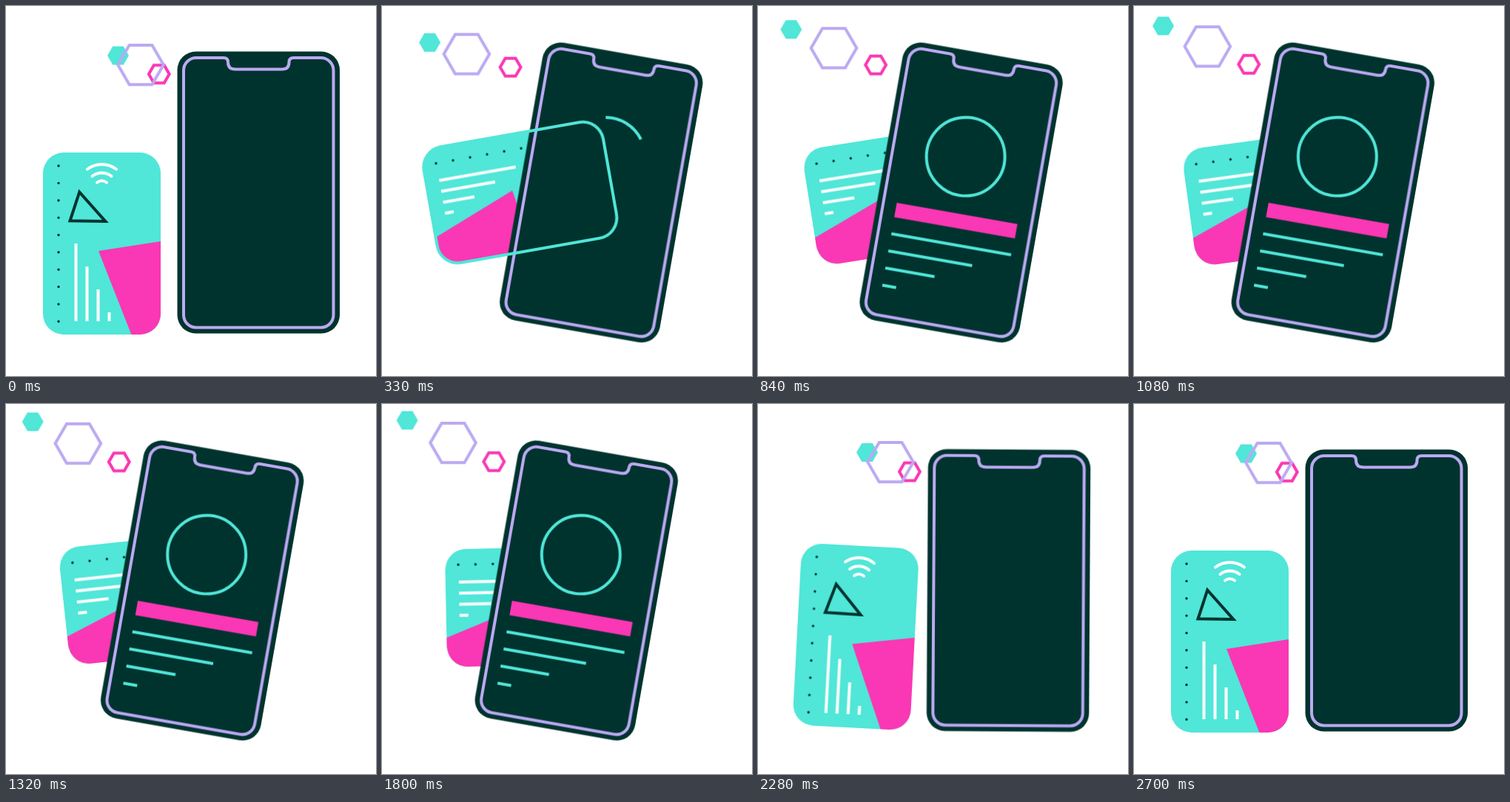
Recreate the animation shown at these times as an HTML page. Size 500 px wide and 500 px high, loop 2.76 s.

```html
<!DOCTYPE html>
<html lang="en">
<head>
<meta charset="utf-8">
<title>Card and phone</title>
<style>
  :root {
    --dark: #00332e;
    --teal: #50e6d8;
    --pink: #fa37b4;
    --lilac: #bba9f2;
  }
  html, body { margin: 0; width: 100%; height: 100%; overflow: hidden; background: #fff; }
  svg { display: block; width: 100%; height: 100%; }

  .hex, .phone, .card-x, .card-y, .card-spin, .outline, .trim {
    animation: 2760ms linear infinite;
  }
  .line { fill: none; stroke-width: 4; }

  /* Three beats: swing out to 12%, drift to 65.22%, return home by 86.96% */
  .hex { animation-name: hex; }
  @keyframes hex {
    0% { transform: translate(0, 0); animation-timing-function: cubic-bezier(.5, 0, .5, 1); }
    12% { transform: translate(var(--ax), var(--ay)); animation-timing-function: cubic-bezier(.33, .83, .67, 1); }
    65.22% { transform: translate(var(--bx), var(--by)); animation-timing-function: cubic-bezier(.6, 0, .3, 1); }
    86.96%, 100% { transform: translate(0, 0); }
  }

  .phone { animation-name: phone; transform-origin: 341px 252px; }
  @keyframes phone {
    0% { transform: translate(0) rotate(0deg); animation-timing-function: cubic-bezier(.5, 0, .5, 1); }
    12% { transform: translate(-45px) rotate(10deg); animation-timing-function: cubic-bezier(.33, .83, .67, 1); }
    65.22% { transform: translate(-78.5px) rotate(10deg); animation-timing-function: cubic-bezier(.6, 0, .3, 1); }
    86.96%, 100% { transform: translate(0) rotate(0deg); }
  }

  /* Separate axes bend the card's path */
  .card-x { animation-name: card-x; }
  @keyframes card-x {
    0% { transform: translateX(0); animation-timing-function: cubic-bezier(.42, 0, .32, 1); }
    12% { transform: translateX(57.3px); animation-timing-function: cubic-bezier(.33, .1, .67, .65); }
    65.22% { transform: translateX(80px); animation-timing-function: cubic-bezier(.6, 0, .3, 1); }
    86.96%, 100% { transform: translateX(0); }
  }
  .card-y { animation-name: card-y; }
  @keyframes card-y {
    0% { transform: translateY(0); animation-timing-function: cubic-bezier(.5, 0, .5, 1); }
    12% { transform: translateY(-69px); animation-timing-function: cubic-bezier(.33, 0, .67, .3); }
    65.22% { transform: translateY(-47.5px); animation-timing-function: cubic-bezier(.65, -.6, .55, 1); }
    86.96%, 100% { transform: translateY(0); }
  }
  .card-spin { animation-name: card-spin; transform-origin: 129.5px 321px; }
  @keyframes card-spin {
    0% { transform: rotate(0deg); animation-timing-function: cubic-bezier(.5, 0, .5, 1); }
    12% { transform: rotate(80deg); animation-timing-function: cubic-bezier(.33, 0, .67, .3); }
    65.22% { transform: rotate(88.8deg); animation-timing-function: cubic-bezier(.6, 0, .3, 1); }
    86.96%, 100% { transform: rotate(0deg); }
  }

  .outline { animation-name: outline; }
  @keyframes outline {
    0%, 3% { opacity: 0; }
    8%, 13% { opacity: 1; }
    21%, 100% { opacity: 0; }
  }

  .trim { stroke-dasharray: 1 2; stroke-dashoffset: 1; animation-timing-function: cubic-bezier(.5, 0, .5, 1); }
  .ring { animation-name: ring; }
  .bar { animation-name: bar; }
  .text { animation-name: text; }
  @keyframes ring {
    0%, 6.5% { stroke-dashoffset: 1; }
    24%, 65.22% { stroke-dashoffset: 0; }
    76%, 100% { stroke-dashoffset: 1; }
  }
  @keyframes bar {
    0%, 12.5% { stroke-dashoffset: 1; }
    26%, 65.22% { stroke-dashoffset: 0; }
    76%, 100% { stroke-dashoffset: 1; }
  }
  @keyframes text {
    0%, 13.5% { stroke-dashoffset: 1; }
    28%, 64% { stroke-dashoffset: 0; }
    76%, 100% { stroke-dashoffset: 1; }
  }
</style>
</head>
<body>
<svg viewBox="0 0 500 500">
  <defs>
    <clipPath id="card-shape"><rect x="50" y="198" width="159" height="246" rx="28"/></clipPath>
    <polygon id="hexagon" points="1,0 .5,.866 -.5,.866 -1,0 -.5,-.866 .5,-.866"/>
  </defs>

  <g class="hex" style="--ax:-87px;--ay:-17.7px;--bx:-117.5px;--by:-45px">
    <use href="#hexagon" transform="translate(151.5 67) scale(14.5)" fill="var(--teal)"/>
  </g>
  <g class="hex" style="--ax:-33.3px;--ay:-9.3px;--bx:-55.6px;--by:-14px">
    <use href="#hexagon" transform="translate(206.8 92) scale(13.9)" fill="none" stroke="var(--pink)" stroke-width=".29"/>
  </g>
  <g class="hex" style="--ax:-67.7px;--ay:-14.5px;--bx:-86px;--by:-27px">
    <use href="#hexagon" transform="translate(182 79.5) scale(30.8)" fill="none" stroke="var(--lilac)" stroke-width=".13"/>
  </g>

  <g class="card-x"><g class="card-y"><g class="card-spin">
    <g clip-path="url(#card-shape)">
      <rect x="50" y="198" width="159" height="246" fill="var(--teal)"/>
      <path d="M125 331 L210 317.8 V445 H169.8 Z" fill="var(--pink)"/>
    </g>
    <path d="M71 216 V427" fill="none" stroke="var(--dark)" stroke-width="3.4"
      stroke-linecap="round" stroke-dasharray="0 23.36"/>
    <g class="line" stroke="#fff">
      <path d="M110 220.5 A32.5 32.5 0 0 1 149 220.5 M116.5 230 A21 21 0 0 1 142.5 230 M123 238.5 A10.7 10.7 0 0 1 136 238.5"
        stroke-linecap="round"/>
      <path d="M94.5 321 V426 M109.5 352 V426 M124.5 383 V426 M139.5 414 V426"/>
    </g>
    <path class="line" d="M99.2 251.5 L86.5 290.3 L134.3 291 Z" stroke="var(--dark)"/>
  </g></g></g>

  <g class="phone">
    <rect x="231.5" y="61.5" width="219.5" height="381" rx="25" fill="var(--dark)"/>
    <path class="line" stroke="var(--lilac)" d="M257 70 H294 Q300 70 300 76 Q300 85.5 310 85.5 H373 Q382.5 85.5 382.5 76
      Q382.5 70 388.5 70 H425.5 A17 17 0 0 1 442.5 87 V417.5 A17 17 0 0 1 425.5 434.5
      H257 A17 17 0 0 1 240 417.5 V87 A17 17 0 0 1 257 70 Z"/>
    <circle class="line trim ring" cx="338.8" cy="203.2" r="53" pathLength="1"
      stroke="var(--teal)" transform="rotate(-100 338.8 203.2)"/>
    <path class="trim bar" d="M258 290.6 H423.5" pathLength="1" stroke="var(--pink)" stroke-width="19.8"/>
    <g class="line" stroke="var(--teal)">
      <path class="trim text" d="M258 323.3 H422.3" pathLength="1"/>
      <path class="trim text" d="M258 346.8 H373" pathLength="1"/>
      <path class="trim text" d="M258 370.3 H325.5" pathLength="1"/>
      <path class="trim text" d="M258 393.8 H277" pathLength="1"/>
    </g>
  </g>

  <g class="card-x"><g class="card-y"><g class="card-spin">
    <rect class="line outline" x="50" y="198" width="159" height="246" rx="28" stroke="var(--teal)"/>
  </g></g></g>
</svg>
</body>
</html>
```
